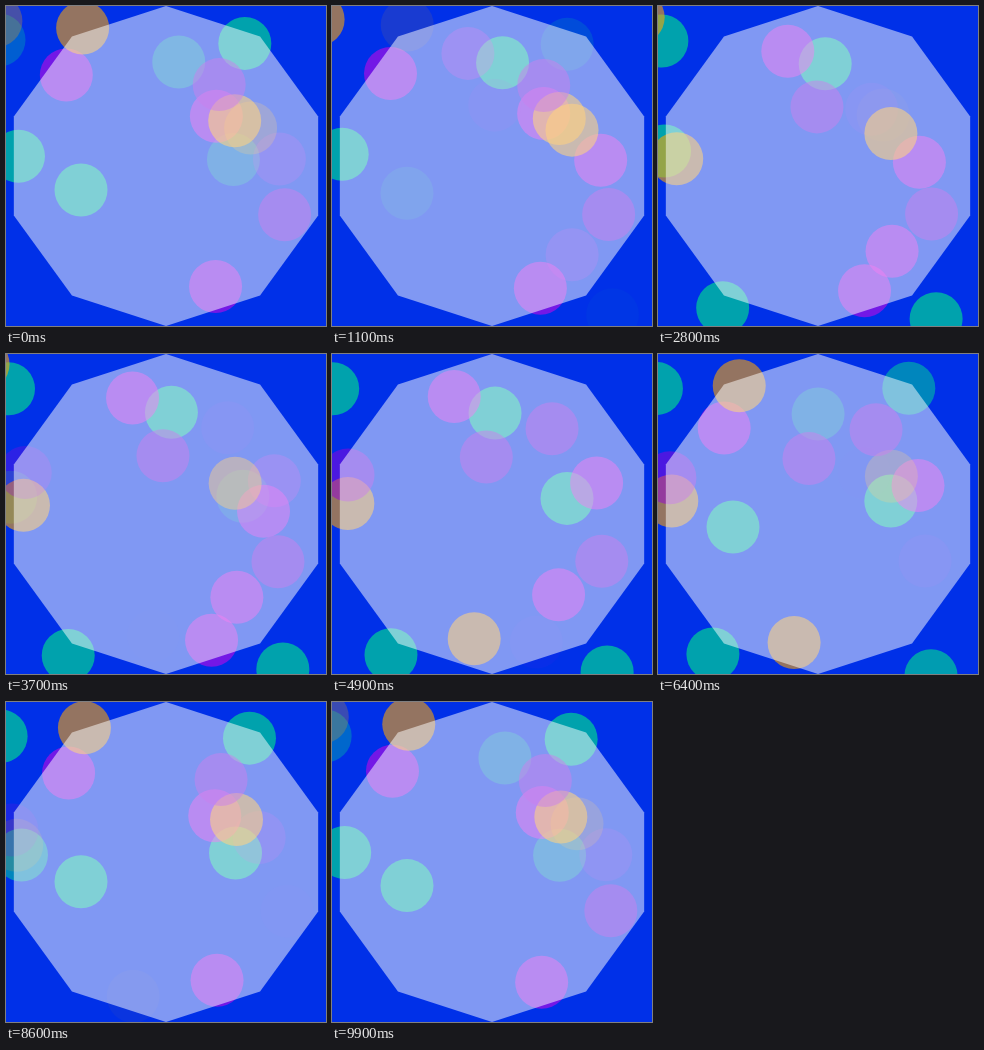
An HTML page with a canvas that plays this animation: 320x320 px, repeating every 10000 ms.

```html
<!DOCTYPE html>
<html lang="en">
<head>
<meta charset="utf-8">
<title>Drifting circles</title>
<style>
html, body { margin: 0; width: 100%; height: 100%; overflow: hidden; background: #0030e8; }
canvas { display: block; width: 320px; height: 320px; }
</style>
</head>
<body>
<canvas id="stage" width="320" height="320"></canvas>
<script>
const ctx = document.getElementById('stage').getContext('2d');
const SIZE = 320, LOOP = 10, STEP = 0.1, FADE = 1.2, RADIUS = 26.5;
const TAU = Math.PI * 2;

// Painted in this order
const palette = {
  teal: 'rgba(0,255,127,0.55)',
  purple: 'rgba(230,0,230,0.5)',
  orange: 'rgba(255,165,0,0.58)',
  violet: 'rgba(150,0,220,0.5)'
};

const circle = (color, x, y, heading, life) => ({ color, x, y, angle: heading * TAU / 360, life });

// Circles appear in bursts: the k-th one at start + gap * k^power seconds.
const burst = (start, gap, power, list) =>
  list.map((c, k) => ({ ...c, birth: start + gap * k ** power }));

// Each circle is given by its place halfway through life, its heading and its life span.
const circles = [
  ...burst(0.5, 0.18, 1, [
    circle('purple', 128, 44.5, 200, 5.6),
    circle('purple', 232, 244, 210, 5.4),
    circle('violet', 155.5, 102.5, 155, 7),
    circle('teal', 276, 316.5, 120, 6.5),
    circle('teal', 60, 301, 190, 6.6),
    circle('orange', 15.5, 149, 230, 7.5),
    circle('teal', -1, 34.5, 185, 8.9)
  ]),
  ...burst(3, 0.17, 1, [
    circle('violet', 13, 123, 145, 6),
    circle('purple', 261, 131, 150, 5.8),
    circle('teal', 232, 148, 130, 7.2),
    circle('violet', 216, 77, 150, 8.8),
    circle('orange', 137, 288, 148, 5)
  ]),
  ...burst(5, 0.055, 2, [
    circle('orange', 79, 27, 245, 6.3),
    circle('teal', 75, 178.5, 90, 6.3),
    circle('purple', 62, 70.5, 220, 7.5),
    circle('teal', 244, 36, 165, 5.9),
    circle('orange', 229.5, 116, 238, 7),
    circle('purple', 210, 111, 295, 6.6),
    circle('purple', 208.5, 282, 125, 8),
    circle('teal', 10.5, 148.5, 222, 6.5),
    circle('violet', 274, 208, 189, 8.1)
  ]),
  ...burst(9.35, 0.08, 1, [
    circle('teal', 166.5, 58, 162, 7.6),
    circle('orange', -18, 12, 200, 5.7),
    circle('orange', 236, 126, 155, 5.1),
    circle('purple', 264, 155.5, 165, 5.2)
  ])
];

const order = Object.keys(palette);
circles.sort((a, b) => order.indexOf(a.color) - order.indexOf(b.color));

function drawCircle({ color, x, y, angle, life, birth }, t) {
  const age = (t - birth + LOOP) % LOOP;
  if (age >= life) return;
  const travel = 120 / life; // short-lived circles go further
  const shift = travel * (age / life - 0.5);
  ctx.globalAlpha = Math.min(1, age / FADE, (life - age) / FADE);
  ctx.fillStyle = palette[color];
  ctx.beginPath();
  ctx.arc(x + shift * Math.cos(angle), y + shift * Math.sin(angle), RADIUS, 0, TAU);
  ctx.fill();
}

function drawDecagon() {
  const r = SIZE / 2;
  ctx.globalAlpha = 0.5;
  ctx.fillStyle = '#fff';
  ctx.beginPath();
  for (let i = 0; i < 10; i++) {
    const a = i * TAU / 10;
    ctx.lineTo(r + r * Math.sin(a), r - r * Math.cos(a));
  }
  ctx.fill();
}

function draw(t) {
  ctx.globalAlpha = 1;
  ctx.fillStyle = '#0030e8';
  ctx.fillRect(0, 0, SIZE, SIZE);
  for (const c of circles) drawCircle(c, t);
  drawDecagon();
}

const start = performance.now();
function tick() {
  const t = (performance.now() - start) / 1000 % LOOP;
  draw(Math.floor(t / STEP) * STEP);
  requestAnimationFrame(tick);
}
tick();
</script>
</body>
</html>
```
